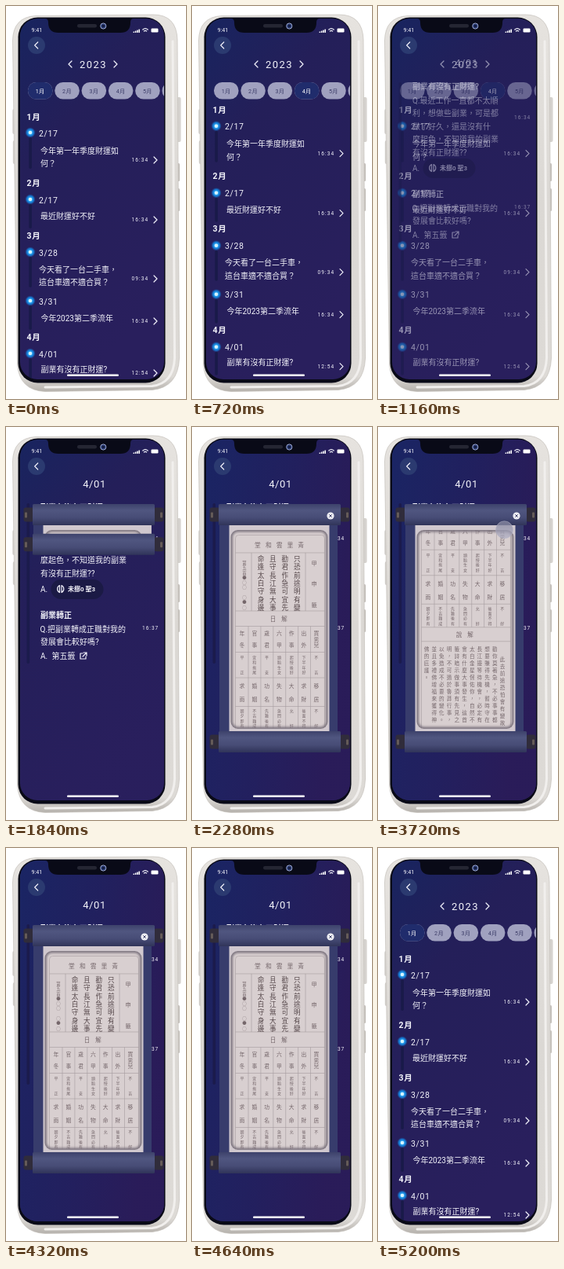
An HTML page for the animation above (5280 ms loop, 230 px wide and 500 px high).

```html
<!DOCTYPE html>
<html lang="zh-Hant">
<meta charset="utf-8">
<style>
html, body { margin: 0; width: 100%; height: 100%; overflow: hidden; background: #fff; }
svg { display: block; width: 230px; height: 500px; }
text { font-family: Roboto, "Noto Sans CJK TC", "Noto Sans CJK", sans-serif; fill: #f4f4fb; }
.mid { text-anchor: middle; }
.bold { font-weight: 700; }
.paper text { font-family: "Noto Sans CJK TC", "Noto Sans CJK", sans-serif; fill: #75676b; text-anchor: middle; }
.paper .poem { font-weight: 500; fill: #55474a; }
.line { fill: none; stroke: #f0f0fa; stroke-width: 1.2; stroke-linecap: round; stroke-linejoin: round; }
.rule { fill: none; stroke: #a59a9e; stroke-width: .6; }
</style>
<svg viewBox="0 0 230 500" id="stage"></svg>
<script>
const text = (x, y, s, size = 10, cls = '', gap = 0, extra = '') =>
  `<text x="${x}" y="${y + size * .36}" font-size="${size}" class="${cls}" letter-spacing="${gap}" ${extra}>${s}</text>`;
const rect = (x, y, w, h, r, fill, extra = '') =>
  `<rect x="${x}" y="${y}" width="${w}" height="${h}" rx="${r}" fill="${fill}" ${extra}/>`;
const circle = (x, y, r, fill, extra = '') => `<circle cx="${x}" cy="${y}" r="${r}" fill="${fill}" ${extra}/>`;
const path = (d, cls = 'line') => `<path class="${cls}" d="${d}"/>`;
const chevron = (x, y, dir = 1, h = 4) => path(`M${x - dir * h / 2} ${y - h}l${dir * h} ${h}l${-dir * h} ${h}`);
const group = (id, body, extra = '') => `<g id="${id}" ${extra}>${body}</g>`;
const gradient = (id, dir, ...stops) => `<linearGradient id="${id}" ${dir}>` +
  stops.map(([at, color]) => `<stop offset="${at}" stop-color="${color}"/>`).join('') + '</linearGradient>';

// Vertical writing: one position per character
const column = (x, y, s, size, pitch, cls = '') => {
  const chars = [...s];
  return `<text font-size="${size}" class="${cls}" x="${chars.map(() => x).join(' ')}" y="${
    chars.map((_, i) => (y + i * pitch + size * .36).toFixed(1)).join(' ')}">${s}</text>`;
};

const chip = (i, on, id = '') => `<g id="${id}">` +
  rect(28 + i * 34.3, 97, 31.5, 21.5, 10.5, on ? '#202c6c' : '#a0a1bf') +
  text(43.7 + i * 34.3, 108, i + 1 + '月', 7.2, 'mid', .3, `style="fill:${on ? '#fff' : '#3c3d68'}"`) + '</g>';

const entry = (y, date, lines, x, first, time, timeY) =>
  rect(29.3, y + 6, 3.6, timeY - y + 5, 1.8, '#191a49') +
  circle(31, y, 6.5, 'url(#glow)') + circle(31, y, 2.3, '#d5f4ff') +
  text(42, y + 1, date, 10.5, '', .6) +
  lines.map((s, i) => text(x, first + i * 16.5, s, 10)).join('') +
  text(160.5, timeY, time, 6.5, '', 1.1) + chevron(191, timeY);

const months = [[141, 1], [225, 2], [292, 3], [421, 4]];
const list =
  group('rows', months.map(([y, m]) => text(26.5, y, m + '月', 10.5, 'bold', .8)).join('') +
    entry(161, '2/17', ['今年第一年季度財運如', '何？'], 44, 184, '16:34', 196) +
    entry(246, '2/17', ['最近財運好不好'], 44, 267.5, '16:34', 272) +
    entry(313, '3/28', ['今天看了一台二手車，', '這台車適不適合買？'], 42, 335, '09:34', 347) +
    entry(375, '3/31', ['今年2023第二季流年'], 44.5, 397, '16:34', 401) +
    entry(442, '4/01', ['副業有沒有正財運?'], 44.5, 462, '12:54', 467)) +
  chevron(82, 74, -1) + text(111.5, 74, '2023', 13, 'mid', 1.4) + chevron(140, 74) +
  [0, 1, 2, 3, 4, 5].map(i => chip(i, false)).join('') + chip(0, true, 'january') + chip(3, true, 'april');

const detail = rect(26.5, 97, 3.6, 204, 1.8, '#1b1b4c') +
  text(113, 72, '4/01', 13, 'mid', .6) +
  text(44, 102, '副業有沒有正財運?', 10, 'bold') +
  ['Q.最近工作一直都不太順', '利，想做些副業，可是都', '做了好久，還是沒有什', '麼起色，不知道我的副業', '有沒有正財運??']
    .map((s, i) => text(44, 120 + i * 16.5, s, 10)).join('') +
  text(174, 142, '16:34', 6.5, '', 1) +
  text(44, 206, 'A.', 10) + rect(57.5, 194, 67, 25, 12.5, '#1b1a45') +
  path('M68.5 201.5a5 5 0 0 0 0 9zM71 201.5a5 5 0 0 1 0 9z') + text(79, 206.5, '未擲0 聖3', 8, 'bold') +
  text(44, 239, '副業轉正', 10, 'bold') +
  text(43.5, 257, 'Q.把副業轉成正職對我的', 10) + text(174, 256, '16:37', 6.5, '', 1) +
  text(44, 273, '發展會比較好嗎?', 10) + text(44, 291, 'A.', 10) + text(58.5, 291, '第五籤', 10) +
  path('M98 288h-3v7h7v-3M99 287h4v4M103 287l-5 5');

const fortunes = [
  ['年冬', '平正', '求雨', '朝夕即有'], ['官事', '宜和拖尾', '婚姻', '不吉難成'],
  ['歲君', '平安', '功名', '先難後有'], ['六甲', '頭胎生女', '失物', '急問必有'],
  ['作事', '起慢後好', '大命', '允好'], ['出外', '下半年好', '求財', '後面不得'],
  ['買男兒', '不吉', '移居', '不好']];
const reading = ['佛的庇護。', '並且多禮佛增福來獲得神', '以免造成不必要的變化。', '明，不可過於魯莽行事，',
  '籤詩暗示做事須有先見之', '會有什麼大事發生，這首', '太白金星保佑你，自然不', '長江邊等待機會，必定有',
  '想要賺得先機，暫時守在', '勸你莫著急，不必事事都', '此去前途恐怕會有變故'];
const cell = (s, x, y, height, size) => column(x, y, s, size, height / (s.length - 1));
const paperText =
  `<rect x="55.5" y="137.5" width="114" height="390" rx="4" class="rule"/>` +
  path('M55.5 160h114M55.5 234h114M55.5 253.5h114M55.5 286.5h114M55.5 319h114M55.5 355.5h114M55.5 385h114M55.5 403h114M55.5 516h114M145 160v74M76 160v74' +
    [0, 1, 2, 3, 4, 5].map(i => `M${72 + i * 15.9} 253.5V385`).join(''), 'rule') +
  [...'堂和雲里青'].map((c, i) => text(84 + i * 13.8, 150, c, 7.8)).join('') +
  ['命逢太白守身邊', '且守長江無大事', '勸君作急可宜先', '只恐前途明有變']
    .map((s, i) => column(88 + i * 15.4, 168, s, 8.6, 10.3, 'poem')).join('') +
  column(156, 173, '甲申籤', 7.2, 26.5) + column(67, 173, '第五首●○○　○●○', 5.4, 6.3) +
  text(103.5, 244, '日', 7.5) + text(118, 244, '解', 7.5) +
  fortunes.map(([head, sub, head2, sub2], i) => {
    const x = 64 + i * 15.8;
    return cell(head, x, 263, 15, 6.8) + cell(sub, x, 293, 19, 5) +
      cell(head2, x, 329.5, 17, 6.8) + cell(sub2, x, 361, 19, 5);
  }).join('') +
  text(103.5, 395, '說', 7.5) + text(118, 395, '解', 7.5) +
  reading.map((s, i) => column(62 + i * 9.7, i === 10 ? 426 : 413, s, 6.6, 9)).join('') +
  [...'籤詩解'].map((c, i) => text(91 + i * 20, 522, c, 7.5)).join('');

const roller = rect(22.5, -9, 13, 18, 3, '#302c3b') + rect(189, -9, 12.5, 18, 3, '#302c3b') +
  rect(24, -3, 3, 7, 1, '#655b58') + rect(197, -3, 3, 7, 1, '#655b58') +
  rect(34, -13.5, 156, 27, 1.5, 'url(#cloth)');

const popup =
  rect(35, 111, 151, 100, 0, '#373c6c', 'id="backing"') +
  rect(47.5, 111, 128, 100, 0, '#d0c8ce', 'id="sheet"') +
  group('window', `<g clip-path="url(#inset)">${rect(49.5, 131, 124, 253, 9, '#d8cfd0')}
    ${group('content', paperText, 'class="paper"')}
    ${rect(49.5, 131, 124, 253, 9, 'none', 'stroke="#7d747f" stroke-width="5" filter="url(#soft)"')}</g>`,
    'clip-path="url(#opened)"') +
  group('bottom', roller) + `<g transform="translate(0 111.5)">${roller}</g>` +
  group('close', circle(177, 113, 4.6, '#eeeef4') + '<path d="M175.3 111.3l3.4 3.4m0-3.4l-3.4 3.4" stroke="#42466d"/>');

const phone = rect(8.3, 131, 4, 32, 2, '#d3d0cc') + rect(8.8, 171, 4, 30, 2, '#d3d0cc') +
  rect(218, 116, 5.5, 57, 2, '#d6d3cf') +
  rect(218, 200, 4, 23, 1.5, '#c4c0bb') + rect(218, 232, 4, 29, 1.5, '#c4c0bb') +
  '<path d="M8.5 44Q9 14 38 12.5L188 11Q218 11 219 43L221.5 448Q220 485 187 488.5L50 490.5Q17 489 14.5 456Z" fill="url(#case)" stroke="#c4c0bb" stroke-width=".7"/>' +
  '<path d="M213 45L215.5 448Q214 480 187 483.5L50 485" fill="none" stroke="#f1efed" stroke-width="3" stroke-linecap="round"/>' +
  rect(15.5, 14.5, 188, 465, 25, '#090a17');

const status = circle(39, 50, 11, '#2b3a70') + chevron(38.7, 50, -1) +
  text(32.5, 30, '9:41', 7.2) +
  '<path d="M50 16h113q-4 0-4 5q0 13-13 13H67q-13 0-13-13q0-5-4-5z" fill="#090a17"/>' +
  rect(91, 23, 25, 4.5, 2.2, '#252633') + circle(124.3, 25.5, 3.6, '#26376f', 'stroke="#a0abd2" stroke-width="1"') +
  circle(124.3, 25.5, 1.4, '#121936') +
  [0, 1, 2, 3].map(i => rect(162.5 + i * 2.3, 32.5 - i, 1.6, 1.5 + i, .4, '#fff')).join('') +
  path('M174.8 30q3.2-2.8 6.4 0M176.3 32q1.7-1.3 3.4 0') + rect(185.5, 28.5, 9, 5, 1.3, '#fff') +
  rect(78, 468.5, 66, 2.6, 1.3, '#fff');

stage.innerHTML = `<defs>
  ${gradient('case', 'x2="0" y2="1"', [0, '#e6e3df'], [.5, '#dbd8d4'], [.96, '#dddad6'], [1, '#b5b1ac'])}
  ${gradient('screen', 'x2=".45" y2="1"', [0, '#18245f'], [.35, '#241f59'], [1, '#291f5d'])}
  ${gradient('shade', 'y2=".3"', [0, '#1a2565'], [.55, '#21205f'], [1, '#2a1b58'])}
  ${gradient('cloth', 'x2="0" y2="1"', [0, '#3d426b'], [.3, '#505680'], [.65, '#474c76'], [1, '#303459'])}
  ${gradient('finger', 'x2="0" y2="1"', [0, '#85869f'], [1, '#b1b0c4'])}
  <radialGradient id="glow"><stop offset=".25" stop-color="#35b5ff"/><stop offset=".65" stop-color="#167bd2"/><stop offset="1" stop-color="#1460b8" stop-opacity=".15"/></radialGradient>
  <filter id="soft"><feGaussianBlur stdDeviation="1.6"/></filter>
  <clipPath id="glass"><rect x="18" y="16" width="184" height="459" rx="22"/></clipPath>
  <clipPath id="opened"><rect x="40" y="111" width="150" height="100" id="opening"/></clipPath>
  <clipPath id="inset"><rect x="49.5" y="131" width="124" height="253" rx="9"/></clipPath>
</defs>${phone}<g clip-path="url(#glass)">
  ${rect(17, 16, 186, 460, 0, 'url(#screen)')}${rect(17, 16, 186, 460, 0, 'url(#shade)', 'id="tint"')}
  ${group('listPage', list)}${group('detailPage', detail)}${group('popup', popup)}${status}
  ${circle(0, 0, 11, 'url(#finger)', 'id="touch" fill-opacity=".75" stroke="#b5b4c8" stroke-width=".5"')}</g>`;

const $ = id => document.getElementById(id);
const ramp = (t, a, b) => Math.min(1, Math.max(0, (t - a) / (b - a)));
const ease = p => p < .5 ? 4 * p ** 3 : 1 - (2 - 2 * p) ** 3 / 2;
const move = (t, a, b) => ease(ramp(t, a, b));
const fade = (id, value) => $(id).setAttribute('opacity', value);
const shift = (id, y) => $(id).setAttribute('transform', `translate(0 ${y})`);

// Each touch: fade-in start, end; fade-out start, end; x; y unless it drags the paper
const touches = [[20, 160, 240, 360, 146, 108], [740, 860, 940, 1040, 120, 458],
  [1380, 1460, 1520, 1600, 99, 291], [2290, 2400, 3130, 3280, 161.5], [3420, 3440, 4130, 4300, 161.5]];

function draw(t) {
  const back = move(t, 4960, 5200);
  const picked = t < 4900 ? move(t, 490, 720) : 0;
  const page = move(t, 1050, 1280) * (1 - back);
  fade('listPage', 1 - page);
  fade('detailPage', page);
  fade('january', 1 - picked);
  fade('april', picked);
  shift('rows', -8.3 * picked);

  const open = move(t, 1720, 2280);
  const end = 138.7 + 261.8 * open;
  const drag = move(t, 2570, 3120) - move(t, 3570, 4120);
  fade('popup', t < 1740 ? 0 : 1 - back);
  fade('tint', .8 * open * (1 - back));
  fade('close', ramp(open, .8, 1));
  for (const id of ['backing', 'sheet', 'opening']) $(id).setAttribute('height', end - 111);
  $('sheet').setAttribute('width', 140 - 12 * ramp(open, 0, .3));
  shift('bottom', end);
  shift('content', -142 * drag);

  const now = touches.find(([a, , , d]) => t >= a && t <= d);
  fade('touch', now ? ramp(t, now[0], now[1]) * (1 - ramp(t, now[2], now[3])) : 0);
  if (now) $('touch').setAttribute('transform', `translate(${now[4]} ${now[5] ?? 261 - 142 * drag})`);
}

const start = performance.now();
(function tick() {
  draw((performance.now() - start) % 5280);
  requestAnimationFrame(tick);
})();
</script>
</html>
```
